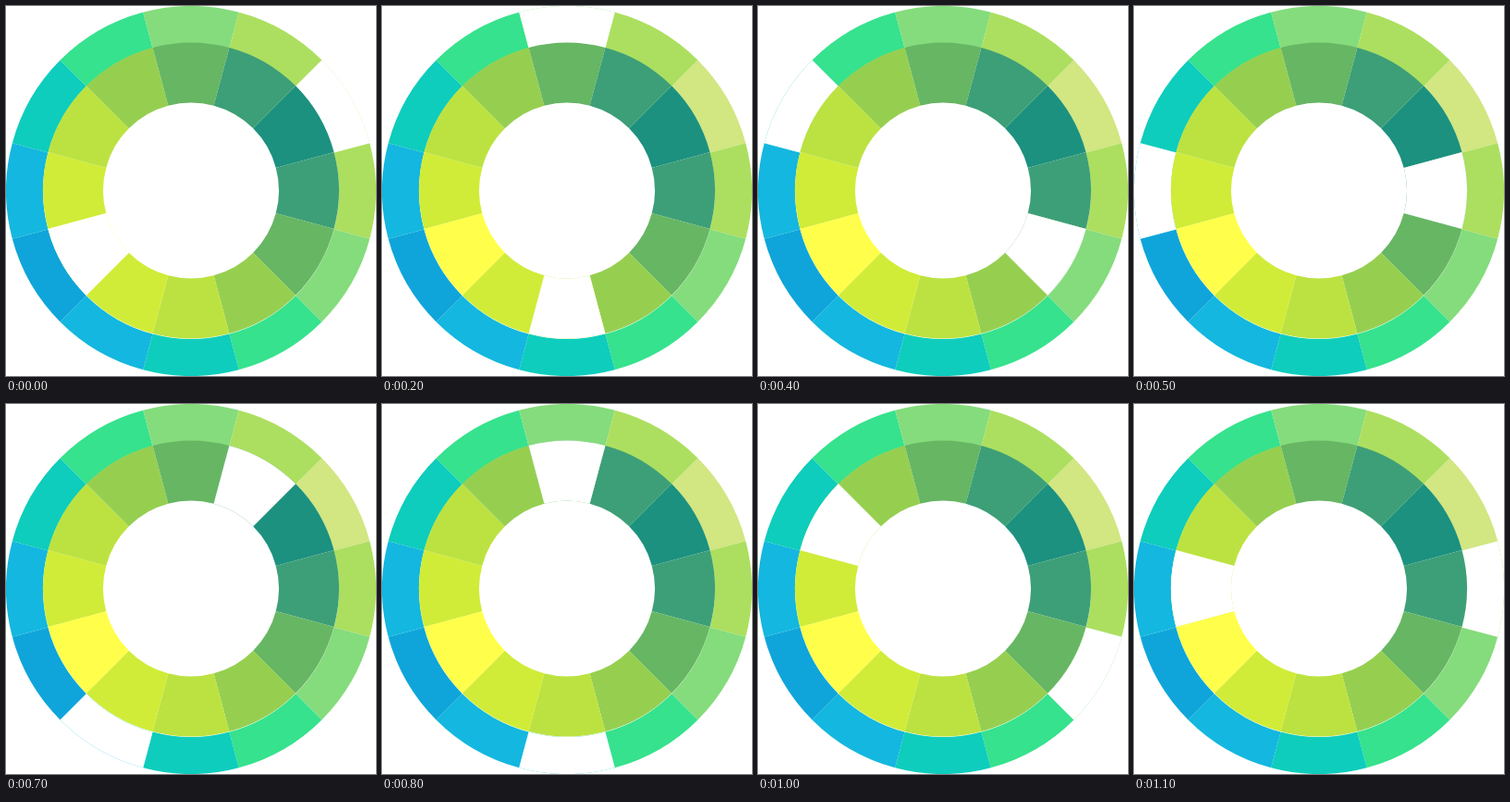
An HTML page with a canvas for the animation above (1.2 s loop, 400x400 px).

```html
<!DOCTYPE html>
<html>
<head>
<meta charset="utf-8">
<title>Counter-placed ring gaps</title>
<style>
  html, body { margin: 0; width: 100%; height: 100%; overflow: hidden; background: #fff; }
  canvas { display: block; }
</style>
</head>
<body>
<canvas id="stage" width="400" height="400"></canvas>
<script>
const ctx = document.getElementById('stage').getContext('2d');
const STEP = Math.PI / 6;

// Colours run from the upper right (-30°) to the lower left (150°), mirrored on both sides.
const rings = [
  { cy: 200, inner: 160, outer: 200, gap: -1,
    colors: ['#d2e682', '#acdf5f', '#85dc7c', '#36e28d', '#0ecdbc', '#14b7df', '#0fa5da'] },
  { cy: 199.5, inner: 95, outer: 160, gap: 5,
    colors: ['#1c917f', '#3d9f77', '#67b663', '#96cf50', '#bce241', '#d0ec38', '#ffff4b'] }
];

function wedge(ring, index, color) {
  const from = (index - 0.5) * STEP, to = from + STEP;
  ctx.beginPath();
  ctx.arc(200, ring.cy, ring.outer, from, to);
  ctx.arc(200, ring.cy, ring.inner, to, from, true);
  ctx.closePath();
  ctx.fillStyle = color;
  ctx.fill();
}

function draw(step) {
  ctx.fillStyle = '#fff';
  ctx.fillRect(0, 0, 400, 400);
  for (const ring of rings) {
    for (let i = 0; i < 12; i++) wedge(ring, i - 1, ring.colors[Math.min(i, 12 - i)]);
    wedge(ring, ring.gap - step, '#fff');
  }
}

const start = performance.now();
function tick() {
  draw(Math.floor((performance.now() - start) / 100) % 12);
  requestAnimationFrame(tick);
}
tick();
</script>
</body>
</html>
```
